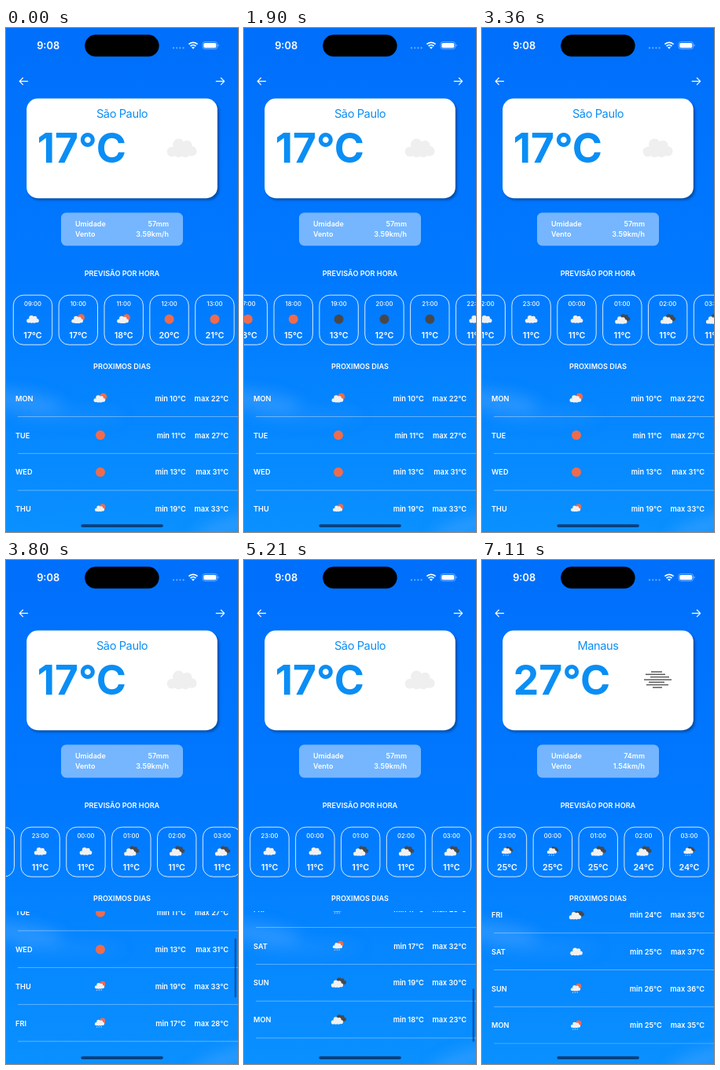
An HTML page for the animation above (8 s loop, 295 by 640 pixels).

```html
<!DOCTYPE html>
<html lang="pt">
<head>
<meta charset="utf-8">
<title>Previsão do tempo</title>
<style>
  html, body { margin: 0; width: 100%; height: 100%; overflow: hidden; background: #0078fb; }
  svg { display: block; width: 100vw; height: 100vh; font-family: Inter, sans-serif; fill: #fff; }
  .head { font-size: 9.15px; font-weight: 600; text-anchor: middle; }
  .info { font-size: 9px; font-weight: 600; }
  .row { font-size: 9.2px; font-weight: 600; }
  .time { font-size: 7.7px; font-weight: 500; text-anchor: middle; }
  .temp { font-size: 10.7px; font-weight: 600; text-anchor: middle; }
  .city { font-size: 14.6px; letter-spacing: -.4px; text-anchor: middle; fill: #0a8ef5; }
  .big { font-size: 51.6px; font-weight: 700; fill: #0a8ef5; }
  .end { text-anchor: end; }
  .arrow { fill: none; stroke: #fff; stroke-width: 1.2; stroke-linecap: round; stroke-linejoin: round; }
</style>
</head>
<body>
<svg viewBox="0 0 295 640" preserveAspectRatio="none">
  <defs>
    <linearGradient id="sky" x1="0" y1="0" x2="0" y2="1">
      <stop offset="0" stop-color="#006ffb"/>
      <stop offset=".5" stop-color="#0079ff"/>
      <stop offset=".75" stop-color="#0585ff"/>
      <stop offset="1" stop-color="#0a90ff"/>
    </linearGradient>
    <filter id="soft" x="-50%" y="-100%" width="200%" height="300%"><feGaussianBlur stdDeviation="9"/></filter>
    <filter id="shade" x="-10%" y="-10%" width="120%" height="125%"><feGaussianBlur stdDeviation="1.5"/></filter>
    <clipPath id="list"><rect y="446" width="295" height="168.6"/></clipPath>
    <g id="cloud">
      <circle cx="-12.3" cy="4.7" r="6.2"/><circle cx="-4" cy="-4.2" r="7.3"/>
      <circle cx="6.5" cy="-3.2" r="6.2"/><circle cx="12.5" cy="4" r="6.2"/>
      <circle cx="-4" cy="5" r="6.6"/><circle cx="4.5" cy="5.2" r="6.4"/>
    </g>
  </defs>

  <rect width="295" height="640" fill="url(#sky)"/>
  <g filter="url(#soft)" fill="#5fb0ff">
    <ellipse cx="18" cy="474" rx="55" ry="12" opacity=".4" transform="rotate(8 18 474)"/>
    <ellipse cx="80" cy="492" rx="70" ry="9" opacity=".15"/>
    <ellipse cx="280" cy="634" rx="45" ry="10" opacity=".4" transform="rotate(-18 280 634)"/>
  </g>

  <text x="39.2" y="26.5" font-size="12.8" font-weight="600">9:08</text>
  <rect x="100.2" y="8.6" width="94.4" height="27.6" rx="13.8" fill="#000"/>
  <g opacity=".45">
    <circle cx="213" cy="25.3" r="1.1"/><circle cx="217.2" cy="25.3" r="1.1"/>
    <circle cx="221.4" cy="25.3" r="1.1"/><circle cx="225.6" cy="25.3" r="1.1"/>
  </g>
  <g fill="none" stroke="#fff" stroke-width="1.8">
    <path d="M232.4 20.6a8 8 0 0 1 11.2 0M234.6 23a5 5 0 0 1 6.8 0"/>
  </g>
  <path d="M236 24.6a3 3 0 0 1 4 0l-2 2.1z"/>
  <rect x="250" y="17.6" width="18.6" height="9" rx="2.8" fill="none" stroke="#fff" stroke-opacity=".5" stroke-width=".8"/>
  <rect x="251.3" y="18.9" width="16" height="6.4" rx="1.7"/>
  <path d="M269.6 20.6a1.6 1.6 0 0 1 0 3z" opacity=".6"/>

  <path class="arrow" d="M27.6 67.7H17.2m4.2-4.2L17.2 67.7l4.2 4.2"/>
  <path class="arrow" id="next" d="M267.2 67.7h10.4m-4.2-4.2l4.2 4.2l-4.2 4.2"/>

  <rect x="28.5" y="92.5" width="242.5" height="126" rx="14" fill="#00306e" opacity=".6" filter="url(#shade)"/>
  <rect x="26.2" y="89.6" width="242.6" height="126.6" rx="14"/>
  <g id="now"></g>

  <rect x="70" y="234.5" width="155" height="42" rx="6.5" opacity=".46"/>
  <g class="info">
    <text x="88" y="252">Umidade</text><text x="88" y="265">Vento</text>
    <text class="end" id="humid" x="207" y="252"></text><text class="end" id="wind" x="207" y="265"></text>
  </g>

  <text class="head" x="147.5" y="315">PREVISÃO POR HORA</text>
  <g id="hours"></g>
  <text class="head" x="147.5" y="432.5">PROXIMOS DIAS</text>
  <g clip-path="url(#list)"><g id="days"></g></g>
  <rect id="bar" x="290.6" width="2.3" rx="1.15" fill="#002a66" opacity="0"/>
  <rect x="95.3" y="630.2" width="104.6" height="3.7" rx="1.8" fill="#083f7c"/>
</svg>

<script>
const $ = id => document.getElementById(id);
const LOOP = 8000, PITCH = 57.85, ROW = 46.8, X_END = 811.9, Y_END = 207;
const SUN = '#ee6c4d', DARK = '#48484a', PALE = '#f1f1f1';

const dot = (x, y, r, fill) => `<circle cx="${x}" cy="${y}" r="${r}" fill="${fill}"/>`;
const cloud = (x, y, s, fill = PALE) =>
  `<use href="#cloud" transform="translate(${x} ${y}) scale(${s})" fill="${fill}"/>`;
const drops = '<path d="M-4 4.2l-.8 1.7M-1.2 4.2l-.8 1.7M1.6 4.2l-.8 1.7" stroke="#dfe6ee" stroke-width=".8"/>';

const icons = {
  sun: dot(0, 0, 6, SUN),
  night: dot(0, 0, 6, DARK),
  cloud: cloud(0, 0, .42),
  few: dot(3.7, -2, 4.5, SUN) + cloud(-1.2, .6, .4),
  broken: cloud(2.6, -2, .4, DARK) + cloud(-1.6, 1.2, .41),
  rain: dot(2.8, -2.8, 3.6, SUN) + cloud(-1, -.4, .33) + drops,
  rainNight: cloud(1.8, -2.6, .3, DARK) + cloud(-1, -.4, .33) + drops
};
const mist = [[215, 229], [208, 233], [214, 238], [206, 241], [212, 232], [209, 237], [217, 229]]
  .map(([a, b], i) => `<path d="M${a} ${142 + i * 3.3}H${b}"/>`).join('');
const icon = (name, x, y) => `<g transform="translate(${x} ${y})">${icons[name]}</g>`;

const run = (...pairs) => pairs.flatMap(([v, n]) => Array(n).fill(v));
const names = ['MON', 'TUE', 'WED', 'THU', 'FRI', 'SAT', 'SUN', 'MON'];

const cities = [{
  name: 'São Paulo', temp: 17, humid: '57mm', wind: '3.59km/h',
  art: cloud(223.5, 152.3, 1.02, '#efefef'),
  temps: [17, 17, 18, 20, 21, 22, 22, 21, 18, 15, 13, 12, ...run([11, 7])],
  sky: run(['cloud', 1], ['few', 2], ['sun', 7], ['night', 3], ['cloud', 3], ['broken', 3]),
  days: [['few', 10, 22], ['sun', 11, 27], ['sun', 13, 31], ['rain', 19, 33],
         ['rain', 17, 28], ['rain', 17, 32], ['broken', 19, 30], ['broken', 18, 23]]
}, {
  name: 'Manaus', temp: 27, humid: '74mm', wind: '1.54km/h',
  art: `<g stroke="#5c5c5c" stroke-width="1.5">${mist}</g>`,
  temps: run([25, 17], [24, 2]),
  sky: run(['rainNight', 16], ['broken', 2], ['rainNight', 1]),
  days: [...run([['rain', 25, 35], 4]), ['broken', 24, 35], ['cloud', 25, 37], ['rain', 26, 36], ['rain', 25, 35]]
}];

function show(c) {
  $('now').innerHTML = `<text class="city" x="147.5" y="113.9">${c.name}</text>
    <text class="big" x="39.8" y="170.5">${c.temp}°C</text>${c.art}`;
  $('humid').textContent = c.humid;
  $('wind').textContent = c.wind;
  $('hours').innerHTML = c.temps.map((temp, i) => {
    const hour = String((9 + i) % 24).padStart(2, '0');
    return `<g transform="translate(${34 + i * PITCH} 0)">
      <rect x="-24.7" y="339.2" width="49.4" height="63" rx="13" fill="none" stroke="#fff" stroke-opacity=".85"/>
      <text class="time" y="352.8">${hour}:00</text>${icon(c.sky[i], 0, 369.8)}
      <text class="temp" y="394.3">${temp}°C</text></g>`;
  }).join('');
  $('days').innerHTML = c.days.map(([sky, min, max], i) =>
    `<g class="row" transform="translate(0 ${470.5 + i * ROW})">
      <text x="12" y="3.3">${names[i]}</text>${icon(sky, 120, -.2)}
      <text class="end" x="228.9" y="3.3">min ${min}°C</text>
      <text class="end" x="283" y="3.3">max ${max}°C</text>
      <path d="M15 23H295" stroke="#fff" stroke-opacity=".45" stroke-width=".8"/></g>`).join('');
}

// A flick: the finger speeds up, then the list glides to rest.
const drag = (t, start, end, dist) => dist * ((t - start) / (end - start)) ** 2;
const glide = (t, start) => Math.exp(-(t - start) / 450);

function hoursX(t) {
  if (t < 440) return 0;
  if (t < 700) return drag(t, 440, 700, 114);
  if (t < 2150) return 519 - 405 * glide(t, 700);
  if (t < 2400) return 503 + drag(t, 2150, 2400, 64.9);
  return X_END - 244 * glide(t, 2400);
}

function daysY(t) {
  if (t < 3480) return 0;
  if (t < 3770) return drag(t, 3480, 3770, 69.5);
  if (t < 4226) return 69.5 + 216 * (1 - glide(t, 3770));
  if (t < 4850) {
    const s = (t - 4226) / 1000;
    return Y_END + 174 * s * Math.exp(-12 * s);
  }
  if (t < 5050) return Y_END + 20 * Math.sin((t - 4850) / 200 * Math.PI / 2);
  const s = (t - 5050) / 1000 * 16;
  return Y_END + 20 * (1 + s) * Math.exp(-s);
}

let shown;
function draw(t) {
  const city = cities[t < 7110 ? 0 : 1];
  if (city !== shown) show(shown = city);

  const held = t < 500 ? 0 : 500 + Math.max(0, Math.floor((t - 480) / 109)) * 109;
  const y = daysY(held), over = Math.max(0, y - Y_END);
  $('hours').setAttribute('transform', `translate(${-hoursX(held).toFixed(2)} 0)`);
  $('days').setAttribute('transform', `translate(0 ${-y.toFixed(2)})`);

  const bar = $('bar');
  bar.setAttribute('y', 452 + Math.min(1, y / Y_END) * 85 + over);
  bar.setAttribute('height', 75 - over);
  bar.setAttribute('opacity', held < 3480 || t >= 6870 ? 0 : t < 6750 ? .55 : .25);
  $('next').setAttribute('opacity', t >= 6330 && t < 6610 ? .4 : 1);
}

function tick() {
  draw(performance.now() % LOOP);
  requestAnimationFrame(tick);
}
tick();
</script>
</body>
</html>
```
